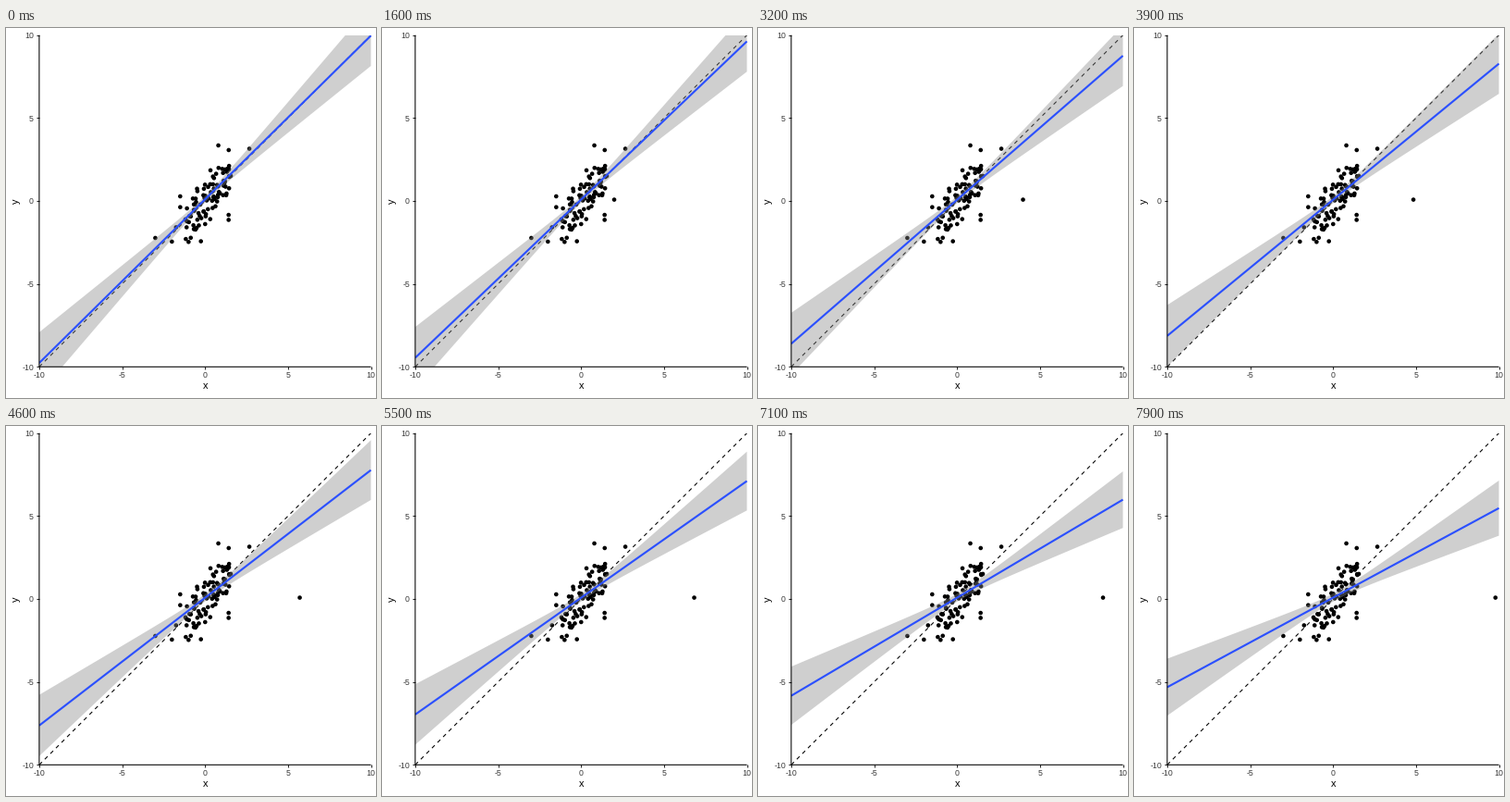
Write a matplotlib script that moves like this. It is 400 px wide and 400 px high and loops after 10 s.

```python
import numpy as np
import matplotlib.pyplot as plt
from matplotlib.animation import FuncAnimation

SIZE, DPI = 400, 100
PT = 72 / DPI  # points per pixel
CX, CY, UNIT = 215.2, 187.0, 17.93  # plot origin and pixels per data unit
FRAMES, MOVING, INTERVAL = 100, 79, 100
THIN, THICK, DOT = 1.067 * PT, 2.134 * PT, 4.6 * PT

plt.rcParams["font.family"] = "Liberation Sans"
plt.rcParams["axes.unicode_minus"] = False


def make_cloud(count=99):
    """Noisy y = x cloud with a few landmark points on its rim."""
    rim = np.array([(-3, -2.23), (-2, -2.45), (-1.5, 0.28), (-0.25, -2.43),
                    (0.8, 3.35), (1.42, -0.84), (1.42, -1.14), (2.67, 3.15)])
    rng = np.random.default_rng(12)
    rest = count - len(rim)
    x = rng.triangular(-1.9, 0.1, 2.1, rest)
    y = 0.1 + x + rng.triangular(-1.7, 0, 1.7, rest)
    return np.vstack([rim, np.column_stack([x, y])])


def regression(u, x):
    """Least-squares line and 95% half-width with the outlier at u."""
    n, sxy, syy = 100, 113.1, 207.0
    sxx = 114.6 + 0.99 * u * u
    x_mean, y_mean = 0.07 + u / n, 0.17
    slope = sxy / sxx
    spread = np.sqrt((syy - slope * sxy) / (n - 2))
    half = 1.984 * spread * np.sqrt(1 / n + (x - x_mean) ** 2 / sxx)
    return y_mean + slope * (x - x_mean), half


fig = plt.figure(figsize=(SIZE / DPI, SIZE / DPI), dpi=DPI, facecolor="white")
side = 20 * UNIT / SIZE
ax = fig.add_axes([CX / SIZE - side / 2, 1 - CY / SIZE - side / 2, side, side])
ax.set(xlim=(-10, 10), ylim=(-10, 10))
ticks = range(-10, 11, 5)
ax.set_xticks(ticks, [str(t) for t in ticks])
ax.set_yticks(ticks, [str(t) for t in ticks])
ax.tick_params(length=2.75 * PT, width=THIN, pad=2.2 * PT,
               labelsize=8.8 * PT, color="#242424", labelcolor="#3B3B3B")
ax.tick_params(axis="y", pad=3.2 * PT)
for name, spine in ax.spines.items():
    spine.set_visible(name in ("left", "bottom"))
    spine.set_linewidth(THIN)
    spine.set_capstyle("butt")
    spine.set_snap(False)
title = dict(size=11 * PT, ha="center", va="center")
fig.text(CX / SIZE, 1 - 386.5 / SIZE, "x", **title)
fig.text(11 / SIZE, 1 - CY / SIZE, "y", rotation=90, **title)

cloud = make_cloud()
# One size per dot keeps sub-pixel positions
dots = ax.scatter([0] * (len(cloud) + 1), [0] * (len(cloud) + 1),
                  s=np.full(len(cloud) + 1, DOT ** 2), color="black", lw=0,
                  snap=False, zorder=2)
ax.plot([-10, 10], [-10, 10], color="black", lw=THIN, ls=(0, (4, 4)),
        dash_capstyle="butt", zorder=2.1)
band, = ax.fill([0, 0, 0], [0, 0, 0], color="#888888", alpha=0.4, lw=0, zorder=2.2)
line, = ax.plot([], [], color="#2B50FF", lw=THICK, solid_capstyle="butt", zorder=2.3)
grid = np.linspace(-10, 10, 80)


def update(frame):
    u = 0.02 + 9.77 * min(frame, MOVING) / MOVING
    fit, half = regression(u, grid)
    dots.set_offsets(np.vstack([cloud, (u, 0.08)]))
    line.set_data(grid, fit)
    band.set_xy(np.column_stack([
        np.r_[grid, grid[::-1]], np.r_[fit + half, (fit - half)[::-1]]]))
    return dots, band, line


anim = FuncAnimation(fig, update, frames=FRAMES, interval=INTERVAL,
                     repeat=True, repeat_delay=0)
plt.show()
```
